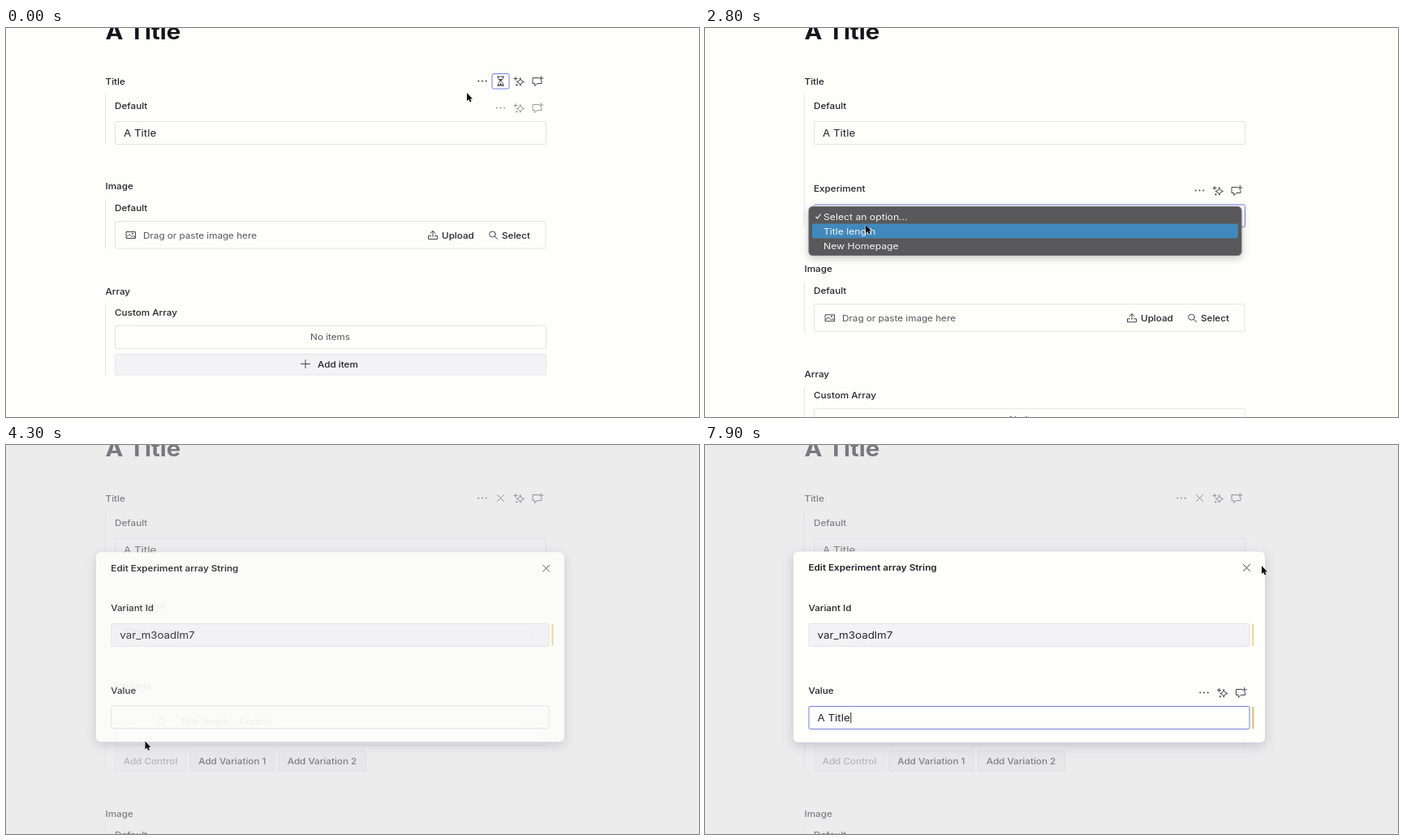
Recreate the animation shown at these times as an HTML page. Size 854 by 480 pixels, loop 8000 ms.

```html
<!DOCTYPE html>
<html lang="en">
<head>
<meta charset="utf-8">
<title>Field experiments</title>
<style>
  html, body { margin: 0; width: 100%; height: 100%; overflow: hidden; background: #fefefb; }
  svg { display: block; width: 854px; height: 480px; }
  text { font-family: Inter, Roboto, sans-serif; font-optical-sizing: none; white-space: pre; }
  .icon { fill: none; stroke: #45454d; stroke-width: 1; stroke-linecap: round; stroke-linejoin: round; }
  .icon .dot { fill: #45454d; stroke: none; }
  .popup { filter: drop-shadow(0 3px 5px rgba(60, 60, 80, .3)); }
  #modal { filter: drop-shadow(0 4px 7px rgba(80, 80, 110, .25)); transform-origin: 399.5px 249px; }
</style>
</head>
<body>
<svg id="stage" viewBox="0 0 854 480"></svg>
<script>
const LOOP = 8000, STEP = 100;
const PAGE = '#fefefb', INK = '#22222a', MUTED = '#55555f', LINE = '#e3e3ea', HOVER = '#b0b0ba';
const FILL = '#f3f3f6', BLUE = '#7880d8';
const WIDE = 1.13; // the whole interface is a little wider than tall

const text = (x, y, label, { size = 10.35, weight = 500, fill = INK, anchor = 'start', id = '' } = {}) =>
  `<text id="${id}" transform="translate(${x} ${y}) scale(${WIDE} 1)" font-size="${size}"
    font-weight="${weight}" fill="${fill}" text-anchor="${anchor}">${label}</text>`;
const value = (x, y, label, id) => text(x, y, label, { size: 11.85, weight: 400, id });
const box = (x, y, w, h, { fill = 'none', stroke = LINE, id = '', r = 1.5 } = {}) =>
  `<rect id="${id}" x="${x + .5}" y="${y + .5}" width="${w}" height="${h}" rx="${r}" fill="${fill}" stroke="${stroke}"/>`;
const bar = (id, y, h) => `<rect id="${id}" x="122" y="${y}" width="1" height="${h}" fill="${LINE}"/>`;
const group = (id, body, cls = '') => `<g id="${id}" class="${cls}">${body}</g>`;

const icon = (x, y, body) => `<g class="icon" transform="translate(${x} ${y})">${body}</g>`;
const star = (x, y, r) => {
  const k = r * .3;
  return `<path d="M${x} ${y - r}l${k} ${r - k} ${r - k} ${k} ${k - r} ${k} ${-k} ${r - k} ${-k} ${k - r} ${k - r} ${-k} ${r - k} ${-k}z"/>`;
};
const icons = {
  dots: (x, y) => icon(x, y, [-4.7, 0, 4.7].map(d => `<circle class="dot" cx="${d}" r="1"/>`).join('')),
  sparkle: (x, y) => icon(x, y, star(1.8, 1, 4.7) + '<path d="M-4-5v4M-6-3h4M-2.6 4v1.6M-3.4 4.8h1.6"/>'),
  comment: (x, y) => icon(x, y, '<path d="M1-4H-6V3h2.7V6L0 3H5V0M4.3-6v5M1.7-3.5H7"/>'),
  cross: (x, y) => icon(x, y, '<path d="M-4-4L4 4M4-4L-4 4"/>'),
  plus: (x, y) => icon(x, y, '<path d="M-5.5 0h11M0-5v10"/>'),
  hourglass: (x, y) => icon(x, y,
    '<path d="M-4-5.5H4M-4 5.5H4M-3-5.5V-3L-.6 0-3 3V5.5M3-5.5V-3L.6 0 3 3V5.5"/><path class="dot" d="M-2.4-2.5H2.4L0 .3zM-2.5 5.3L0 2.6 2.5 5.3z"/>'),
  image: (x, y) => icon(x, y, '<path d="M-5.5-4H5.5V4H-5.5zM-5.5 2.5L-2-1 1.5 2.3 3 .8 5.5 3"/><circle class="dot" cx="2" cy="-1.7" r="1"/>'),
  upload: (x, y) => icon(x, y, '<path d="M-2.5 1H-5.5V5H5.5V1H2.5M0 2V-5M-3-2.3L0-5 3-2.3"/>'),
  search: (x, y) => icon(x, y, '<ellipse cx="-1" cy="-1" rx="3.9" ry="3.5"/><path d="M2 1.7L5.2 5"/>'),
  chevron: (x, y) => icon(x, y, '<path d="M-3.3-1.6L0 1.6 3.3-1.6"/>')
};
const actions = (x, y) => icons.dots(x, y) + icons.sparkle(x + 22.5, y) + icons.comment(x + 45.5, y);

const button = (x, w, label, id) =>
  group(id, box(x, 377, w, 25, { fill: FILL }) + text(x + 10.7, 393.5, label));
const tooltip = (id, w, label) => group(id,
  box(609.5 - w / 2, 33, w, 19, { fill: PAGE, r: 3 }) +
  text(609.5, 46, label, { weight: 400, anchor: 'middle' }), 'popup');
const emptyRow = y => box(134, y, 531, 28) +
  text(399.5, y + 18, 'No items', { weight: 400, fill: MUTED, anchor: 'middle' });

const titleField =
  text(122.5, 13.5, 'A Title', { size: 26, weight: 700, fill: '#15151c' }) +
  text(122.5, 70, 'Title') + bar('titleBar', 82, 61) +
  group('titleActions',
    box(598.5, 56, 21, 18.5, { fill: '#fff', stroke: BLUE, id: 'focusBox', r: 2 }) +
    icons.dots(587, 65.5) + group('hourglass', icons.hourglass(609.5, 65.5)) +
    group('remove', icons.cross(609.5, 65.5)) +
    icons.sparkle(632, 65.5) + icons.comment(655, 65.5)) +
  text(134, 100, 'Default') + group('defaultActions', actions(609.5, 98.5)) +
  box(134, 115, 531, 28, { id: 'titleInput' }) + value(145, 133.5, 'A Title');

const experiment = group('experiment',
  text(134, 202, 'Experiment') + group('experimentActions', actions(609.5, 200.5)) +
  box(134, 217.5, 531, 27.5, { id: 'select' }) + value(145, 236, 'Select an option...', 'choice') +
  icons.chevron(650, 231.5));

const variants = group('variants',
  text(134, 301, 'Variants') +
  group('emptyList', emptyRow(313)) +
  group('filledList', box(134, 313, 531, 57) + box(138, 317, 523, 48) +
    icons.dots(646, 341) +
    icon(152, 341, [-4, 0, 4].map(y => `<path d="M-2 ${y}h.1M2 ${y}h.1"/>`).join('')) +
    icon(191, 341, '<path d="M-4-3H1L4 0V5H-4zM-1-5H4"/>') +
    text(214, 345, 'Title length - Control', { weight: 400 })) +
  group('variantButtons',
    button(134, 88, 'Add Control', 'addControl') +
    button(226.5, 104, 'Add Variation 1') + button(336, 107, 'Add Variation 2')));

const lowerFields = group('lower',
  text(122.5, 199, 'Image') + bar('', 211, 61) + text(134, 225.5, 'Default') +
  box(134, 238, 530.5, 33.5) + icons.image(154, 255.5) +
  text(169, 259.5, 'Drag or paste image here', { weight: 400, fill: MUTED }) +
  icons.upload(526, 255.5) + text(537, 259.5, 'Upload') +
  icons.search(600.5, 255.5) + text(611, 259.5, 'Select') +
  text(122.5, 329, 'Array') + bar('', 341, 87) + text(134, 355, 'Custom Array') + emptyRow(367) +
  box(134, 402, 531, 25.5, { fill: FILL }) + icons.plus(369, 414.5) + text(384, 418.5, 'Add item'));

const menuItem = (y, label) => text(146, y, label, { size: 10.8, weight: 400, fill: '#f4f4f2' });
const menu = group('menu',
  box(127.5, 220, 533, 60, { fill: '#59585a', stroke: '#6d6c6e', r: 4.5 }) +
  '<rect id="highlight" x="132" width="525" height="18" rx="2.5" fill="#4189bd"/>' +
  '<path d="M136.5 232.5l2 2.5 4-5.5" fill="none" stroke="#f4f4f2" stroke-width="1.2"/>' +
  menuItem(236.5, 'Select an option...') + menuItem(254.5, 'Title length') + menuItem(272.5, 'New Homepage'), 'popup');

const modal = group('modal',
  `<rect x="109" y="131.5" width="581" height="235.5" rx="6" fill="${PAGE}"/>` +
  text(127.5, 155, 'Edit Experiment array String', { weight: 600 }) + icons.cross(667.5, 151.5) +
  text(127.5, 205, 'Variant Id') + box(127.5, 220, 543, 28, { fill: FILL }) +
  value(138.5, 238.5, 'var_m3oadlm7') +
  '<rect x="674.5" y="221" width="1.7" height="27" fill="#eccf7c"/>' +
  text(127.5, 307, 'Value') + group('valueActions', actions(615, 305.5)) +
  box(127.5, 322, 543, 28, { id: 'valueInput' }) + value(138.5, 341, '', 'typed') +
  `<rect id="caret" y="330" width="1" height="13" fill="${INK}"/>` +
  '<rect id="changed" x="674.5" y="323" width="1.7" height="27" fill="#d6b45c"/>');

const pointer = '<path id="pointer" d="M0 0V10L2.3 8 3.9 11.4 5.5 10.6 4 7.4H7z" fill="#08080a" stroke="#fff" stroke-width=".8" paint-order="stroke"/>';

document.getElementById('stage').innerHTML =
  `<rect width="854" height="480" fill="${PAGE}"/>` +
  titleField + experiment + variants + lowerFields +
  tooltip('addTip', 100, 'Add experiment') + tooltip('removeTip', 122, 'Remove experiment') + menu +
  '<rect id="overlay" width="854" height="480" fill="#dbdbe0"/>' + modal + pointer;

const el = id => document.getElementById(id);
const set = (id, attrs) => { for (const k in attrs) el(id).setAttribute(k, attrs[k]); };
const fade = (id, opacity) => { el(id).style.opacity = opacity; };
const show = (id, on) => { el(id).style.display = on ? '' : 'none'; };
const ramp = (t, from, to) => Math.min(1, Math.max(0, (t - from) / (to - from)));
const during = (t, from, to) => t >= from && t < to;

// time, x, y of the pointer tip
const path = [
  [0, 568, 80], [400, 607, 66], [1100, 607, 67], [1500, 223, 174], [1800, 193, 224], [1900, 198, 225],
  [2400, 198, 225], [2800, 198, 243], [3000, 198, 243], [3300, 164, 290], [3700, 171.5, 365.5],
  [4700, 171.5, 365.5], [5100, 195, 338], [7200, 195, 338], [7800, 698, 147], [7900, 686, 149]
];
function pointerAt(t) {
  const i = path.findIndex(p => p[0] > t);
  if (i < 0) return path[path.length - 1].slice(1);
  const [a, b] = [path[i - 1], path[i]];
  const k = ramp(t, a[0], b[0]), e = k * k * (3 - 2 * k);
  return [a[1] + (b[1] - a[1]) * e, a[2] + (b[2] - a[2]) * e];
}

const TYPED = 'A Title', KEY_START = 5400, KEY_GAP = 200;

function render(t) {
  const expanded = t >= 1000, chosen = t >= 3400, added = t >= 4000, focused = t >= 5200;

  show('experiment', expanded);
  show('variants', chosen);
  show('emptyList', !added);
  show('filledList', added);
  set('variantButtons', { transform: `translate(0 ${added ? 0 : -29})` });
  fade('addControl', added ? .5 : 1);
  set('lower', { transform: `translate(0 ${added ? 259.5 : chosen ? 230.5 : expanded ? 102.3 : 0})` });
  set('titleBar', { height: added ? 320 : chosen ? 291 : expanded ? 163 : 61 });

  show('hourglass', !expanded);
  show('remove', expanded);
  show('focusBox', t < 2100);
  fade('titleActions', t < 3000 ? 1 - ramp(t, 1500, 1800)
    : t < 5600 ? ramp(t, 3400, 3700) - ramp(t, 5100, 5300) : ramp(t, 7400, 7700));
  fade('defaultActions', t < 1000 ? .55 * (1 - ramp(t, 0, 300)) : ramp(t, 1100, 1300) * (1 - ramp(t, 1300, 1570)));
  fade('experimentActions', ramp(t, 1500, 1800) - ramp(t, 3300, 3600));
  set('titleInput', { stroke: during(t, 1300, 1600) ? HOVER : LINE });
  set('select', { stroke: during(t, 2100, 3700) ? BLUE : during(t, 1700, 2100) ? HOVER : LINE });
  el('choice').textContent = chosen ? 'Title length' : 'Select an option...';

  fade('addTip', expanded ? 0 : ramp(t, 400, 700));
  fade('removeTip', expanded ? 1 - ramp(t, 1300, 1570) : 0);
  fade('menu', t < 2100 ? 0 : 1 - ramp(t, 3000, 3200));
  set('highlight', { y: t < 2600 ? 223 : 241.5 });

  const opening = 1 - (1 - ramp(t, 4100, 4500)) ** 3;
  fade('overlay', .5 * ramp(t, 4000, 4300));
  fade('modal', opening);
  el('modal').style.transform = `scale(${.945 + .055 * opening})`;

  const keys = Math.min(TYPED.length, Math.max(0, Math.floor((t - KEY_START) / KEY_GAP)));
  const lastKey = keys ? KEY_START + keys * KEY_GAP : 5200;
  el('typed').textContent = TYPED.slice(0, keys);
  fade('valueActions', ramp(t, 4900, 5200));
  set('valueInput', { stroke: focused ? BLUE : LINE });
  show('changed', keys > 0);
  show('caret', focused && (t - lastKey) % 1000 < 600);
  set('caret', { x: 139 + el('typed').getComputedTextLength() * WIDE });

  const [x, y] = pointerAt(t);
  set('pointer', { transform: `translate(${x} ${y})` });
  show('pointer', !during(t, 5500, 7300));
}

const start = performance.now();
function tick() {
  const t = (performance.now() - start) % LOOP;
  render(Math.floor(t / STEP) * STEP);
  requestAnimationFrame(tick);
}
tick();
</script>
</body>
</html>
```
